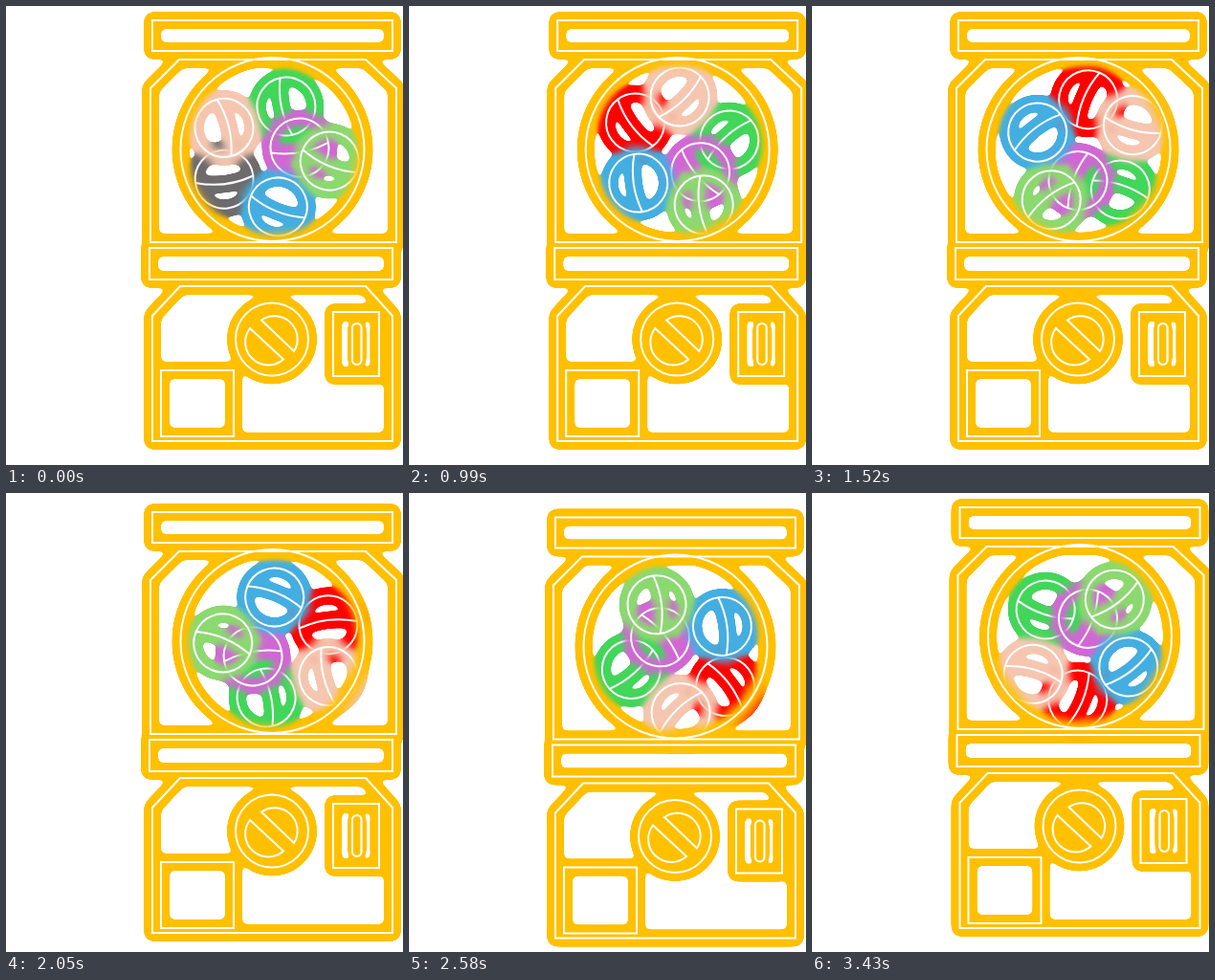
An HTML page that plays this animation: 415x480 px, repeating every 3.64 s.

```html
<!DOCTYPE html>
<html lang="en">
<head>
<meta charset="utf-8">
<title>Capsule machine</title>
<style>
  html, body { margin: 0; height: 100%; overflow: hidden; background: #fff; }
  svg { display: block; width: 100%; height: 100%; }
  .glow { fill: none; stroke-width: 14; stroke-linejoin: round; filter: url(#blur); }
  .line { fill: none; stroke: #fff; stroke-width: 2; }
  .thin { stroke-width: 6; }
  .line .thin { stroke-width: 2; }
</style>
</head>
<body>
<svg viewBox="0 0 415 480">
  <defs>
    <filter id="blur" x="-50%" y="-50%" width="200%" height="200%" color-interpolation-filters="sRGB">
      <feGaussianBlur stdDeviation="3.5"/>
    </filter>
    <!-- Turns the soft outer edges hard while colours inside stay blended -->
    <filter id="harden" filterUnits="userSpaceOnUse" x="-20" y="-20" width="470" height="530" color-interpolation-filters="sRGB">
      <feComponentTransfer><feFuncA type="linear" slope="20" intercept="-5.1"/></feComponentTransfer>
    </filter>
    <g id="capsule">
      <circle r="30.5"/>
      <path d="M-30.5 0Q0 10 30.5 0"/>
    </g>
  </defs>
  <g id="scene" filter="url(#harden)">
    <g id="balls"></g>
    <g id="machine"></g>
  </g>
</svg>
<script>
const LOOP = 3640, FIRST = 460, STEP = 530;
const SHAKE = [[0, 0], [-1, -2.5], [2.2, 0], [0, 0], [0, 5], [0, 10.5], [1.5, 0]];
const CENTER = '282.5 157';
const GREY = '#6e6b6c', RED = '#ff0000';

// Orbit angle, orbit radius, tilt of the seam, colour; back to front
const BALLS = [
  [156, 59.5, -7, RED],
  [281.3, 53, 78, '#42d65a'],
  [-20, 26, -10, '#d167d4'],
  [208.5, 62, -104, '#f5c6b0'],
  [88, 53, 22, '#44aee1'],
  [5.2, 56, 23, '#8bd970'],
];

const MACHINE = `
  <path d="M153 15H404V47H153Z"/>
  <path d="M151 247V86L181 56H376L408 86V247Z"/>
  <path d="M150 253H404V286H150Z"/>
  <path d="M153 455V324L182 293H376L404 324V455Z"/>
  <path d="M162 381H238V450H162Z"/>
  <path d="M342 320H390V387H342Z"/>
  <rect class="thin" x="362" y="332" width="9.5" height="43" rx="4.7"/>
  <circle cx="278.5" cy="150" r="96"/>
  <circle cx="278" cy="348.5" r="38"/>
  <path d="M267 328.5A24 24 0 0 1 301 361ZM255 337A24 24 0 0 0 290 369.5Z"/>`;

const neon = (shape, color) =>
  `<g class="glow" stroke="${color}">${shape}</g><g class="line">${shape}</g>`;

const scene = document.getElementById('scene');
const balls = document.getElementById('balls');
document.getElementById('machine').innerHTML = neon(MACHINE, '#ffc000');
balls.innerHTML = BALLS.map(([angle, radius, tilt, color]) =>
  `<g transform="translate(${CENTER}) rotate(${angle}) translate(${radius}) rotate(${tilt - angle})">
    ${neon('<use href="#capsule"/>', color)}</g>`).join('');
const firstGlow = balls.querySelector('.glow');

let shown = -1;
function draw(now) {
  const t = now % LOOP;
  const pose = t < FIRST ? 0 : 1 + Math.floor((t - FIRST) / STEP);
  if (pose !== shown) {
    shown = pose;
    scene.setAttribute('transform', `translate(${SHAKE[pose]})`);
    balls.setAttribute('transform', `rotate(${60 * Math.max(0, pose - 1)} ${CENTER})`);
    firstGlow.setAttribute('stroke', pose ? RED : GREY);
  }
  requestAnimationFrame(() => draw(performance.now()));
}
draw(performance.now());
</script>
</body>
</html>
```
